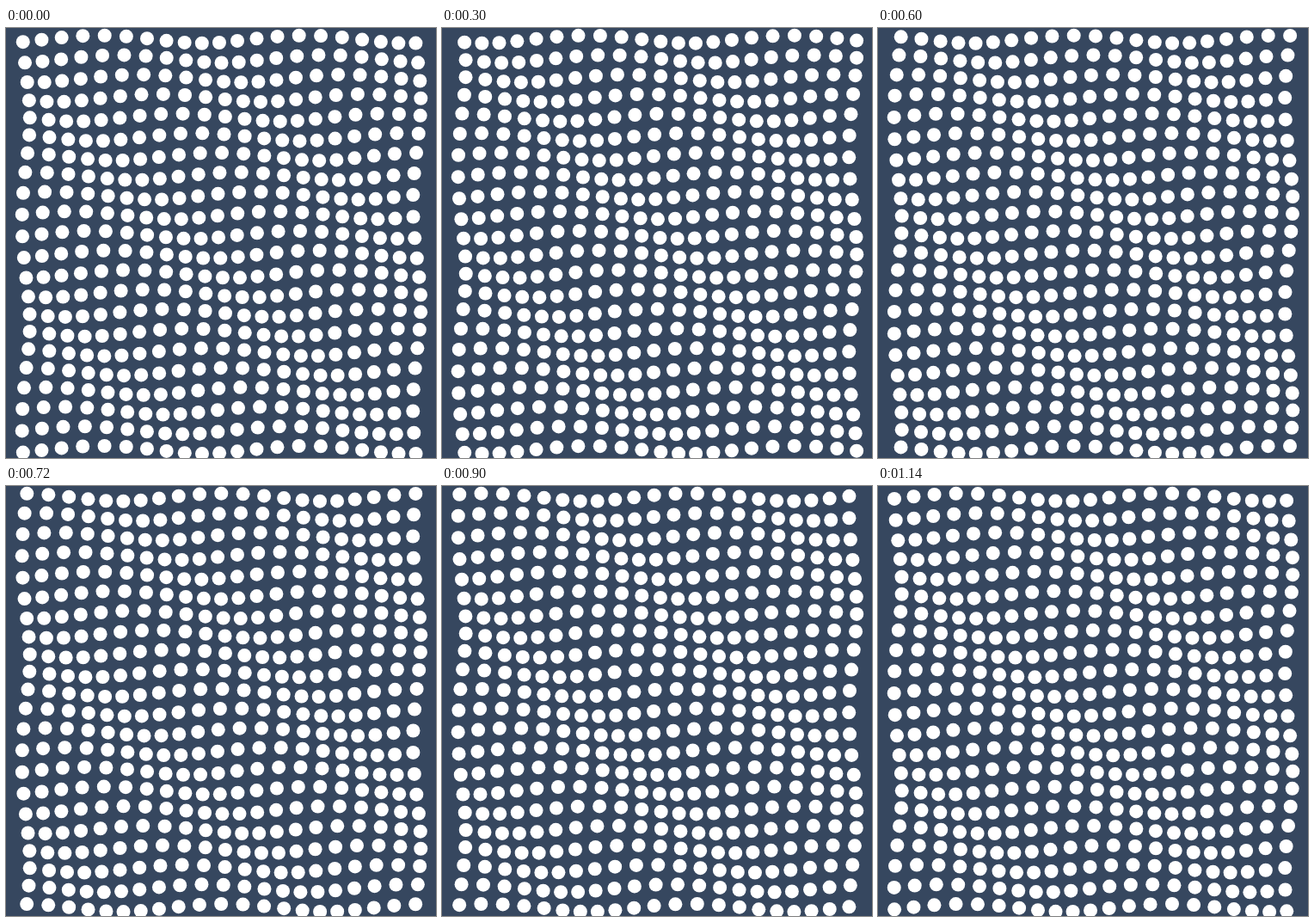
Recreate the animation shown at these times as an HTML page. Size 500 by 500 pixels, loop 1200 ms.

```html
<!DOCTYPE html>
<html lang="en">
<head>
<meta charset="utf-8">
<title>Dot wave</title>
<style>
  html, body { margin: 0; width: 100%; height: 100%; overflow: hidden; background: #36475f; }
  svg { display: block; width: 100%; height: 100%; }
</style>
</head>
<body>
<svg id="stage" viewBox="0 0 500 500" fill="#fff"></svg>
<script>
const LOOP = 1200, TICK = 60;
const COLS = 21, ROWS = 22, GAP = 500 / 22;
const LEFT = GAP + 0.5, TOP = GAP - 9.5;
const ORBIT = GAP / 5, RADIUS = 8;
const LAG = 0.6, START = -0.87;

const stage = document.getElementById('stage');
const dots = [];

for (let row = 0; row < ROWS; row++) {
  for (let col = 0; col < COLS; col++) {
    const node = document.createElementNS('http://www.w3.org/2000/svg', 'circle');
    node.setAttribute('r', RADIUS);
    stage.appendChild(node);
    dots.push({
      node,
      x: LEFT + col * GAP,
      y: TOP + row * GAP,
      phase: START + (row - col) * LAG
    });
  }
}

// Every dot circles its grid point; the phase shifts along the diagonal.
function draw(ms) {
  const turn = Math.floor((ms % LOOP) / TICK) * TICK / LOOP * 2 * Math.PI;
  for (const { node, x, y, phase } of dots) {
    const angle = phase + turn;
    node.setAttribute('cx', (x + ORBIT * Math.sin(angle)).toFixed(2));
    node.setAttribute('cy', (y + ORBIT * Math.cos(angle)).toFixed(2));
  }
}

let begin = null;
function loop(now) {
  if (begin === null) begin = now;
  draw(Math.max(0, now - begin));
  requestAnimationFrame(loop);
}

draw(0);
requestAnimationFrame(loop);
</script>
</body>
</html>
```
